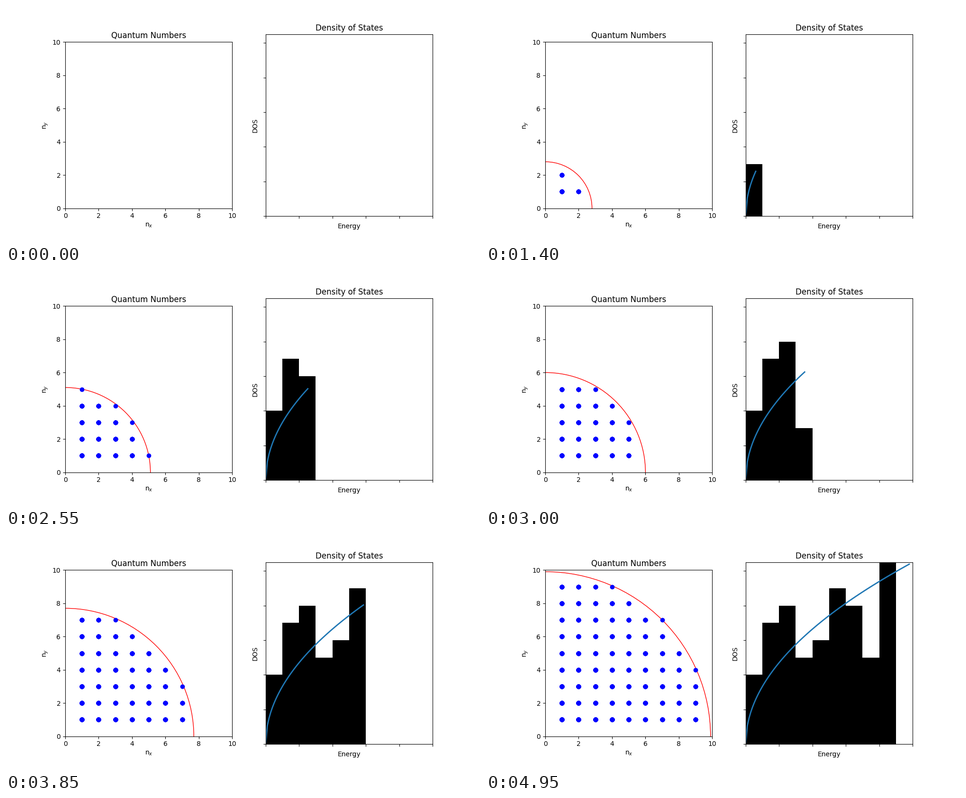
These frames come from a looping animation (1000 by 500 pixels, 5 s). A matplotlib script:

```python
import matplotlib.pyplot as plt
import numpy as np
from matplotlib.animation import FuncAnimation
from matplotlib.patches import Circle

FRAMES = 100
BIN_EDGES = np.arange(0, 100, 10)
DOS_MAX = 10.5

fig, (grid_ax, dos_ax) = plt.subplots(1, 2, figsize=(10, 5), dpi=100)

grid_ax.set(xlim=(0, 10), ylim=(0, 10), aspect="equal",
            title="Quantum Numbers", xlabel="n$_x$", ylabel="n$_y$")
dos_ax.set(xlim=(0, 100), ylim=(0, DOS_MAX), title="Density of States",
           xlabel="Energy", ylabel="DOS")
dos_ax.set_xticks(range(0, 101, 20), [""] * 6)
dos_ax.set_yticks(range(0, 11, 2), [""] * 6)

nx, ny = (n.ravel() for n in np.meshgrid(np.arange(1, 10), np.arange(1, 10)))
energy = nx**2 + ny**2
# First step whose radius (step / 10) encloses each state
first_step = np.floor(10 * np.sqrt(energy)).astype(int) + 1

curve_x = np.linspace(0, 100, 100)
curve_y = DOS_MAX * np.sqrt(curve_x) / 10

front = grid_ax.add_patch(Circle((0, 0), 0, fill=False, edgecolor="r", linewidth=1))
states, = grid_ax.plot([], [], "bo")
bars = dos_ax.bar(BIN_EDGES[:-1], np.zeros(len(BIN_EDGES) - 1), width=10,
                  align="edge", color="k")
curve, = dos_ax.plot([], [], color="C0", linewidth=2)


def update(step):
    front.set_radius(step / 10)
    front.set_visible(step > 0)

    # Markers pile up step after step, which hardens their edges
    layers = np.maximum(step - first_step + 1, 0)
    states.set_data(np.repeat(nx, layers), np.repeat(ny, layers))

    counts, _ = np.histogram(energy[layers > 0], bins=BIN_EDGES)
    for bar, count in zip(bars, counts):
        bar.set_height(count)

    shown = step * step // 100
    curve.set_data(curve_x[:shown], curve_y[:shown])
    return front, states, curve, *bars


anim = FuncAnimation(fig, update, frames=FRAMES, interval=50,
                     repeat=True, repeat_delay=0)
plt.show()
```
